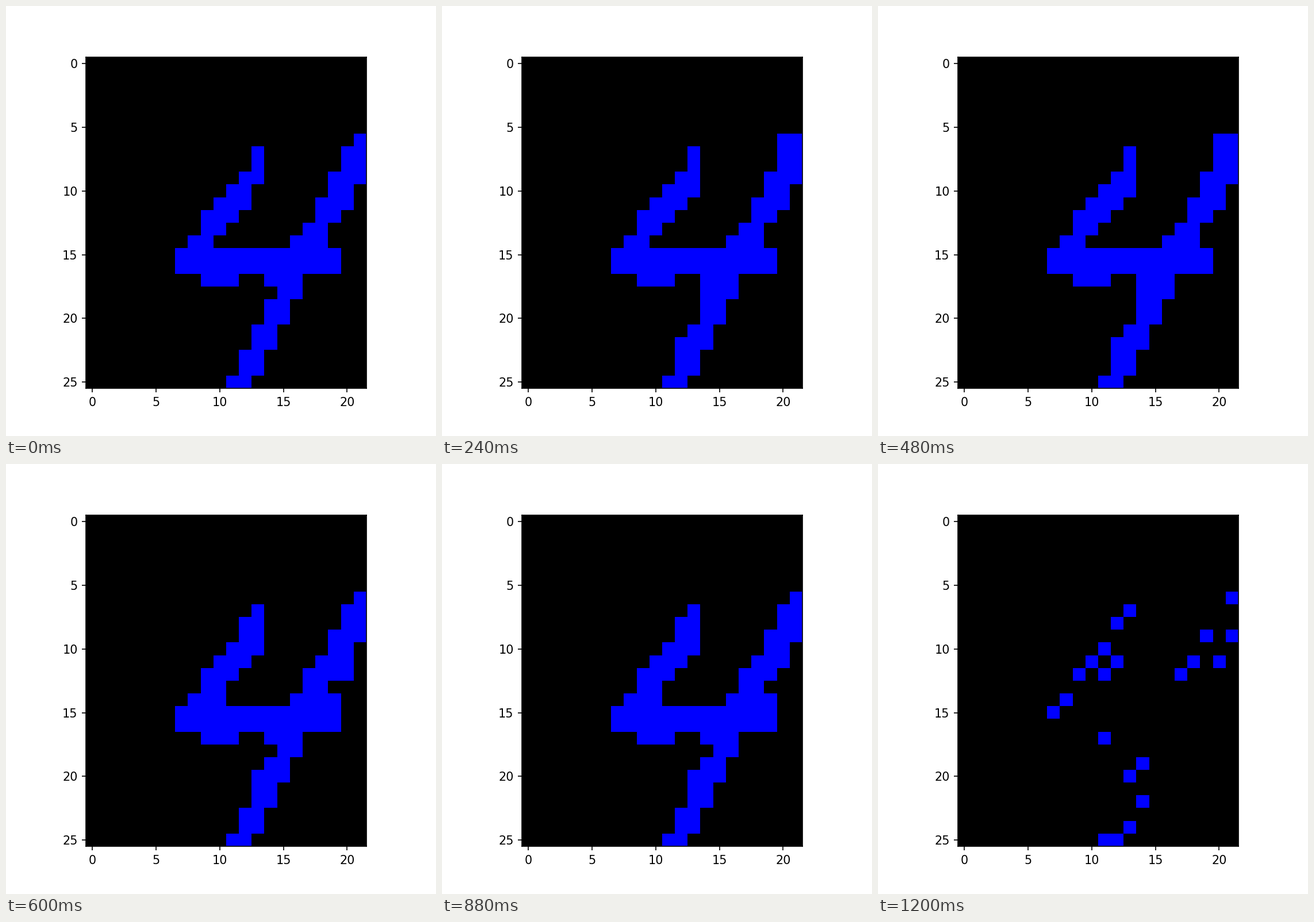
These frames come from a looping animation (748x748 px, 1240 ms). A matplotlib script:

```python
import numpy as np
import matplotlib.pyplot as plt
from matplotlib.animation import FuncAnimation

ROWS, COLS = 26, 22
SIZE = 748
FRAMES, STEP_MS = 31, 40
BLUE = (0, 0, 255)

# Step cells (row, column) that fill in while the outline drifts.
OUTER = [(6, 20), (10, 13), (18, 14), (22, 12)]
INNER = [(8, 12), (10, 13), (12, 17), (14, 10), (14, 19), (20, 13)]


def slant(mask, top, bottom, start, slope, width, limit=COLS):
    """Stroke leaning right: its left edge moves by slope per row."""
    for row in range(top, bottom + 1):
        left = start - slope * (row - top)
        mask[row, int(left):min(int(left + width) + 1, limit)] = True


def make_digit():
    mask = np.zeros((ROWS, COLS), bool)
    slant(mask, 7, 14, 13.85, 0.8, 1.5, limit=14)   # short left arm
    slant(mask, 6, 14, 21.15, 0.51, 1.41)           # long right arm
    slant(mask, 14, 17, 16, 0.5, 2)                 # joint
    slant(mask, 18, 25, 15, 0.5, 1)                 # stem
    mask[15:17, 7:20] = True                        # bar
    mask[17, 9:12] = True                           # sag below the bar
    return mask


def neighbours(mask):
    """Up, down, left and right neighbour of every cell."""
    p = np.pad(mask, 1)
    return p[:-2, 1:-1], p[2:, 1:-1], p[1:-1, :-2], p[1:-1, 2:]


def concave(mask):
    up, down, left, right = neighbours(mask)
    cells = ~mask & (up | down) & (left | right)
    cells[:, -1] = False
    return np.argwhere(cells)


def convex(mask):
    up, down, left, right = neighbours(mask)
    return np.argwhere(mask & (~(up | left) | ~(down | right)))


def fill(mask, cells):
    for row, col in cells:
        mask[row, col] = True
    return mask


rng = np.random.default_rng(4)
DIGIT = make_digit()
FLICKER = rng.permutation(concave(DIGIT))
CORNERS = rng.permutation(convex(fill(DIGIT.copy(), INNER)))[:22]


def grid(i):
    if i == FRAMES - 1:
        return fill(np.zeros_like(DIGIT), CORNERS)
    mask = DIGIT.copy()
    if 15 <= i < 25:
        fill(mask, INNER)
    elif i >= 3:
        fill(mask, OUTER)
    # Every other step one loose corner lights up.
    if i % 2:
        fill(mask, [FLICKER[i // 2 % len(FLICKER)]])
    return mask


def picture(i):
    rgb = np.zeros((ROWS, COLS, 3), np.uint8)
    rgb[grid(i)] = BLUE
    return rgb


fig, ax = plt.subplots(figsize=(5, 5), dpi=SIZE / 5, facecolor="white")
half = 0.5 / SIZE
fig.subplots_adjust(left=0.125 - half, right=0.9 - half,
                    bottom=0.11 + half, top=0.88 + half)
image = ax.imshow(picture(0), interpolation="nearest")
ax.set_xticks(range(0, COLS, 5))
ax.set_yticks(range(0, ROWS, 5))


def update(i):
    image.set_data(picture(i))
    return [image]


anim = FuncAnimation(fig, update, frames=FRAMES, interval=STEP_MS,
                     repeat=True, repeat_delay=0, blit=False)
plt.show()
```
